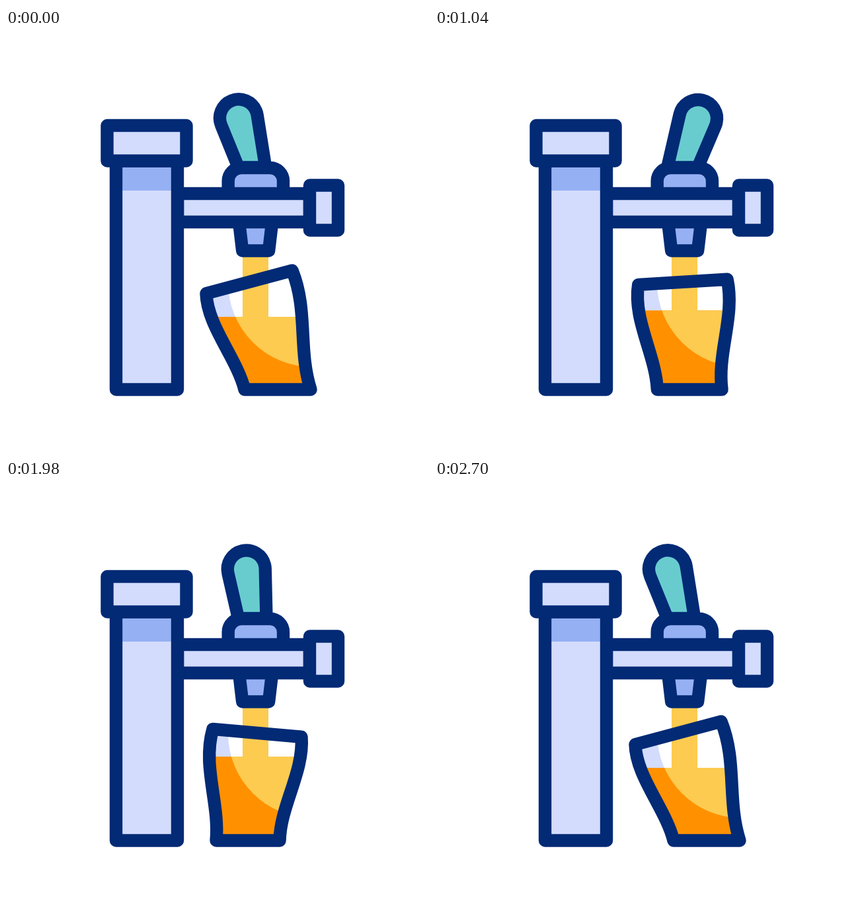
Recreate the animation shown at these times as an HTML page with a canvas. Size 640x640 px, loop 2900 ms.

```html
<!DOCTYPE html>
<html lang="en">
<head>
<meta charset="utf-8">
<title>Beer tap</title>
<style>
  html, body { margin: 0; height: 100%; overflow: hidden; background: #fff; }
  canvas { display: block; }
</style>
</head>
<body>
<canvas id="stage" width="640" height="640"></canvas>
<script>
const ctx = document.getElementById('stage').getContext('2d');
const NAVY = '#022a75', PALE = '#d3dcfd', BLUE = '#95b1f4', TEAL = '#68cccf',
      ORANGE = '#ff9100', YELLOW = '#fdcb50', WHITE = '#fff';
const LOOP = 2900;
const GROUND = 547;

const lerp = (a, b, k) => a + (b - a) * k;
const rad = deg => deg * Math.PI / 180;
const ramp = (t, from, to) => Math.min(1, Math.max(0, (t - from) / (to - from)));
const easeOut = u => u * (1.38 - .38 * u);

function rect(color, left, top, right, bottom) {
  ctx.fillStyle = color;
  ctx.fillRect(left, top, right - left, bottom - top);
}

function paint(path, fill) {
  if (fill) {
    ctx.fillStyle = fill;
    ctx.fill(path);
  }
  ctx.stroke(path);
}

function box(left, top, right, bottom, fill, radius = 0) {
  const path = new Path2D();
  path.roundRect(left, top, right - left, bottom - top, radius);
  paint(path, fill);
}

// Handle: a round knob tapering down to its base; k goes from left to right
function drawLever(k) {
  const path = new Path2D();
  path.moveTo(351.6, 211);
  path.arc(lerp(352, 398, k), lerp(136.3, 137, k), 28.5,
           rad(lerp(157.7, 193.2, k)), rad(lerp(-9, 23.2, k)));
  path.lineTo(lerp(392.8, 397.5, k), 211);
  path.closePath();
  paint(path, TEAL);
}

// The rim turns about its middle while the foot slides along the ground
function glassPath(k) {
  const path = new Path2D();
  const angle = rad(lerp(-15, 5.1, k));
  const rim = side => [lerp(368, 380, k) + side * 67.3 * Math.cos(angle),
                       384.3 + side * 67.3 * Math.sin(angle)];
  const foot = side => [lerp(411, 366, k) + side * lerp(50, 48, k), GROUND];
  // S-shaped side: control points at thirds, pushed sideways
  const wall = ([x0, y0], [x1, y1], push0, push1) => path.bezierCurveTo(
    lerp(x0, x1, 1 / 3) + push0, lerp(y0, y1, 1 / 3),
    lerp(x0, x1, 2 / 3) + push1, lerp(y0, y1, 2 / 3), x1, y1);

  path.moveTo(...rim(-1));
  path.lineTo(...rim(1));
  wall(rim(1), foot(1), 15, -10);
  path.lineTo(...foot(-1));
  wall(foot(-1), rim(-1), 7, -18);
  path.closePath();
  return path;
}

function drawGlass(k) {
  const glass = glassPath(k), level = lerp(437, 420, k);
  const lit = new Path2D();
  lit.arc(464, 385, 128, 0, 2 * Math.PI);

  ctx.save();
  ctx.clip(glass);
  rect(PALE, 280, 340, 480, level);
  rect(ORANGE, 280, level, 480, 560);
  ctx.clip(lit);
  rect(WHITE, 280, 340, 480, level);
  rect(YELLOW, 280, level, 480, 560);
  ctx.restore();

  rect(YELLOW, 358, 337, 397, level + 1);
  paint(glass);
}

function drawTap(lever) {
  paint(new Path2D('M352.5 293 L357.7 337 H397.6 L402.8 293'), BLUE);
  drawLever(lever);
  box(336.2, 211.5, 419.5, 280, BLUE, 20);
  box(259.5, 250.5, 459.5, 293.5, PALE);
  box(459.5, 238, 502.5, 306, PALE);
  rect(PALE, 166.5, 201, 259.5, GROUND);
  rect(BLUE, 166.5, 201, 259.5, 246);
  box(166.5, 201, 259.5, GROUND);
  box(153, 147.5, 273, 201, PALE);
}

function draw(now) {
  const t = now % LOOP;
  const tilt = easeOut(ramp(t, 180, 1980)) - ramp(t, 1980, 2700);
  const lever = ramp(t, 180, 450) - ramp(t, 1780, 2050);
  rect(WHITE, 0, 0, 640, 640);
  ctx.strokeStyle = NAVY;
  ctx.lineWidth = 19.4;
  ctx.lineJoin = 'round';
  drawGlass(tilt);
  drawTap(lever);
  requestAnimationFrame(draw);
}
requestAnimationFrame(draw);
</script>
</body>
</html>
```
